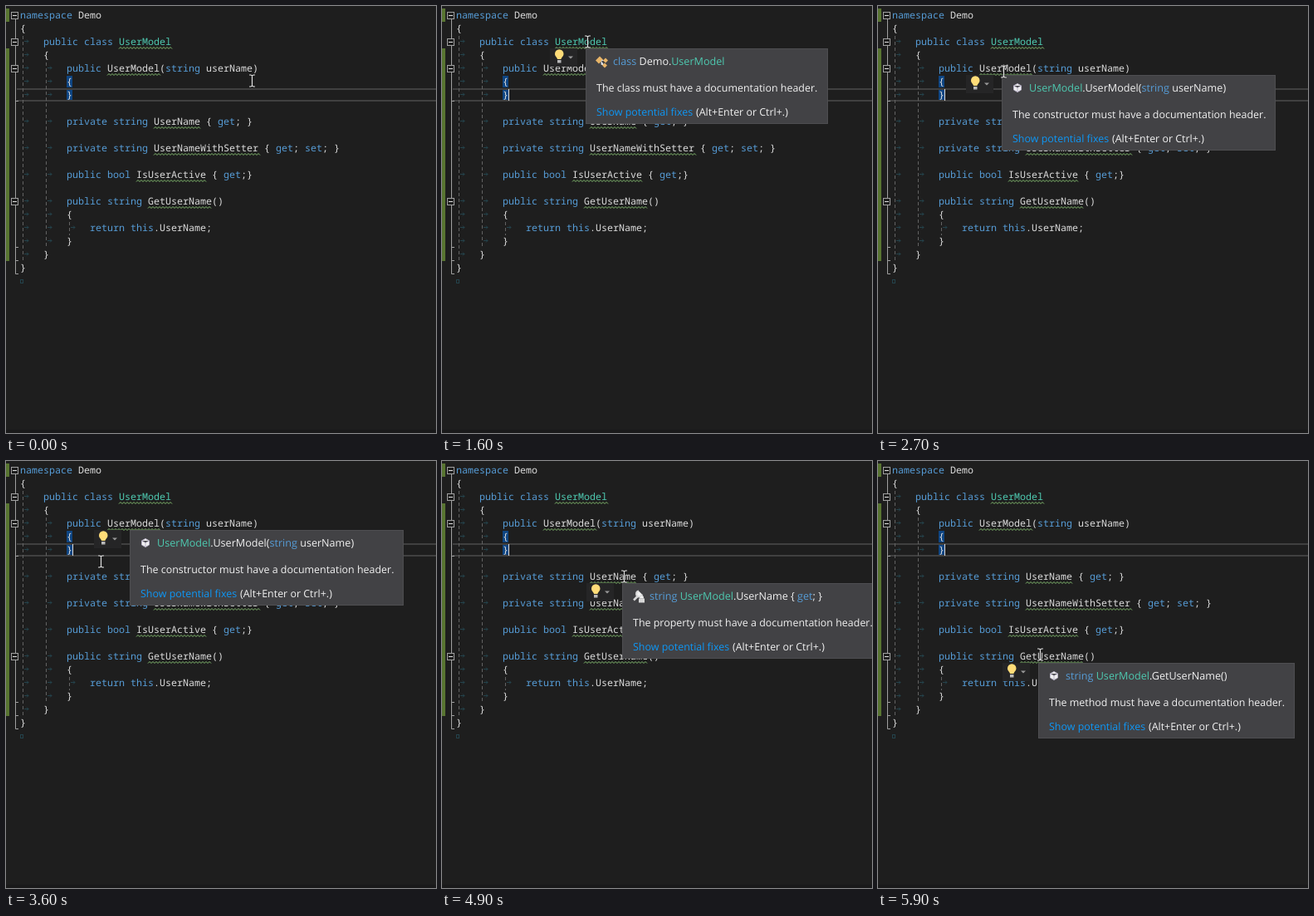
These frames come from a looping animation (518x514 px, 6000 ms). An HTML page:

```html
<!DOCTYPE html>
<html lang="en">
<head>
<meta charset="utf-8">
<title>Code hints</title>
<style>
html, body { margin: 0; height: 100%; overflow: hidden; background: #1e1e1e; }
svg { display: block; }
text { white-space: pre; text-rendering: geometricPrecision; }
.code { font: 11.667px "Noto Sans Mono", monospace; }
.tip { font: 12.45px "Open Sans", sans-serif; fill: #f1f1f1; }
.head { font-size: 12.6px; }
</style>
</head>
<body>
<svg id="stage" width="518" height="514" viewBox="0 0 518 514" fill="none"></svg>
<script>
const BLUE = '#569cd6', TEAL = '#4ec9b0', PLAIN = '#dcdcdc', FAINT = '#24434c';
const KEYWORD = /^(namespace|public|private|class|string|bool|get|set|return|this)$/;

// [indent in tabs, text, underlined name]
const lines = [
  [0, 'namespace Demo'],
  [0, '{'],
  [1, 'public class UserModel', 'UserModel'],
  [1, '{'],
  [2, 'public UserModel(string userName)', 'UserModel'],
  [2, '{'],
  [2, '}'],
  [0, ''],
  [2, 'private string UserName { get; }', 'UserName'],
  [0, ''],
  [2, 'private string UserNameWithSetter { get; set; }', 'UserNameWithSetter'],
  [0, ''],
  [2, 'public bool IsUserActive { get;}', 'IsUserActive'],
  [0, ''],
  [2, 'public string GetUserName()', 'GetUserName'],
  [2, '{'],
  [3, 'return this.UserName;'],
  [2, '}'],
  [1, '}'],
  [0, '}']
];

const cube = '<path d="M0-5L4.5-2.5V2.5L0 5L-4.5 2.5V-2.5ZM-4.5-2.5L0 0L4.5-2.5M0 0V5" stroke="#b9b3c6"/>';
const classIcon = `<path d="M-7-1L-2-6L2-2L-3 3Z" fill="#e8b568"/>
  <path d="M0-1H4M0 0V4H3" stroke="#d8d8d8"/>
  <path d="M2-1L5-4L8-1L5 2ZM1 5L4 2L7 5L4 8Z" fill="#e8b568"/>`;
const wrench = `<path d="M-5 5L2-2" stroke="#d8d8d8" stroke-width="2.5"/>
  <path d="M1-6A3.5 3.5 0 1 0 5-2" stroke="#d8d8d8" stroke-width="2"/>
  <path d="M1 3H8V8H1Z" fill="#d8d8d8"/><path d="M2.500 3V1.500A2 2 0 0 1 6.500 1.500V3" stroke="#d8d8d8"/>`;

const tips = [
  { from: 1400, to: 2100, x: 173, y: 51, w: 292, icon: classIcon, head: 'class Demo.UserModel', kind: 'class' },
  { from: 2600, to: 3700, x: 149, y: 83, w: 330, icon: cube, head: 'UserModel.UserModel(string userName)', kind: 'constructor' },
  { from: 4300, to: 5000, x: 217, y: 147, w: 312, icon: wrench, head: 'string UserModel.UserName { get; }', kind: 'property' },
  { from: 5800, to: 6000, x: 193, y: 243, w: 309, icon: cube, head: 'string UserModel.GetUserName()', kind: 'method' }
];

// Pointer stops: time, x, y
const stops = [
  [0, 296, 89], [200, 296, 89], [1000, 175, 42], [2000, 175, 42], [2400, 151, 78],
  [3000, 151, 78], [3300, 114, 120], [3600, 114, 120], [4000, 219, 138], [4900, 219, 138],
  [5300, 183, 195], [5500, 195, 232], [6000, 195, 232]
];

const rect = (x, y, w, h, fill) => `<rect x="${x}" y="${y}" width="${w}" height="${h}" fill="${fill}"/>`;
const stroke = (d, color, extra = '') => `<path d="${d}" stroke="${color}" ${extra}/>`;

function codeLine([indent, text, name], row) {
  const left = 17 + 28 * indent, y = 15 + 16 * row;
  let out = '';
  for (let i = 0; i < indent; i++)
    out += stroke(`M${22 + 28 * i} ${y - 4.5}h5m-2-2l2 2l-2 2`, FAINT);
  for (const { 0: word, index } of text.matchAll(/\w+|[^\w\s]+/g)) {
    const isType = word === name && text.includes('class');
    const color = isType ? TEAL : KEYWORD.test(word) ? BLUE : PLAIN;
    out += `<text class="code" x="${left + 7 * index}" y="${y}" fill="${color}">${word}</text>`;
  }
  if (name) {
    const x = left + 7 * text.indexOf(name);
    const waves = 'l2-2l2 2'.repeat(Math.round(name.length * 7 / 4));
    out += stroke(`M${x} ${y + 4.5}${waves}`, '#84bd70');
  }
  return out;
}

function gutter() {
  const grey = '#a0a0a0';
  const box = y => `<rect x="6.5" y="${y - 4.5}" width="8" height="8" fill="#1e1e1e" stroke="${grey}"/>`
    + stroke(`M8 ${y - .5}h5`, '#e0e0e0');
  return rect(0, 3, 4, 16, '#587531') + rect(0, 51, 4, 256, '#587531')
    + stroke('M11.500 16V322.500H15M11.500 114.500H15M11.500 290.500H15M11.500 306.500H15', grey)
    + [12, 44, 76, 236].map(box).join('')
    + stroke('M20.500 36V306M48.500 68V290M76.500 260V276', '#626262', 'stroke-dasharray="4 3"');
}

function tip({ x, y, w, icon, head, kind }) {
  const title = head
    .replace(/\b(class|string|get)\b/g, `<tspan fill="${BLUE}">$1</tspan>`)
    .replace('UserModel', `<tspan fill="${TEAL}">UserModel</tspan>`);
  return `<g class="tip" transform="translate(${x} ${y})" visibility="hidden">
    ${rect(-43, 0, 33, 22, '#252526')}
    <path d="M-34 13C-34 11-37 10-37 6.500A5.200 5.200 0 0 1-26.500 6.500C-26.500 10-29.500 11-29.500 13Z" fill="#ffdc78"/>
    ${rect(-34, 14, 4.5, 3.5, '#b8b8b8')}
    <path d="M-21 9.500H-15L-18 12.500Z" fill="#999"/>
    <rect x=".5" y=".5" width="${w - 1}" height="90" fill="#424245" stroke="#4e4e51"/>
    <g transform="translate(19 15.500)">${icon}</g>
    <text class="head" x="33" y="20">${title}</text>
    <text x="13" y="52">The ${kind} must have a documentation header.</text>
    <text x="13" y="81" fill="#0e97f5">Show potential fixes</text>
    <text x="133" y="81">(Alt+Enter or Ctrl+.)</text>
  </g>`;
}

const beam = 'M-3.500-6.500H-1.500L0-5.500L1.500-6.500H3.500M0-5.500V6.500M-3.500 7.500H-1.500L0 6.500L1.500 7.500H3.500';
const stage = document.getElementById('stage');
stage.innerHTML = rect(0, 0, 518, 514, '#1e1e1e') + rect(0, 510, 518, 4, '#19191a')
  + stroke('M13 100H518M13 114H518', '#4c4c4c', 'stroke-width="1.5"')
  + rect(73, 84, 7, 14, '#0e4583') + rect(73, 101, 7, 12, '#0e4583')
  + gutter() + lines.map(codeLine).join('')
  + `<rect x="17.500" y="329.500" width="3" height="4" stroke="${FAINT}"/>`
  + '<path id="caret" d="M80.500 100V114" stroke="#dcdcdc"/>'
  + tips.map(tip).join('')
  + `<g id="pointer">${stroke(beam, '#111', 'stroke-width="2.5" opacity=".5"')}${stroke(beam, '#e4e4e4', 'stroke-width="1.2"')}</g>`;

const caret = document.getElementById('caret');
const pointer = document.getElementById('pointer');
const tipNodes = stage.querySelectorAll('.tip');
const show = (node, on) => node.setAttribute('visibility', on ? 'visible' : 'hidden');

function pointerAt(t) {
  const i = stops.findIndex(stop => stop[0] > t);
  const [t0, x0, y0] = stops[i - 1], [t1, x1, y1] = stops[i];
  const p = (t - t0) / (t1 - t0), e = p * p * (3 - 2 * p);
  return [x0 + (x1 - x0) * e, y0 + (y1 - y0) * e].map(Math.round);
}

function draw(now) {
  const t = Math.floor(now % 6000 / 100) * 100;
  const [x, y] = pointerAt(t === 100 ? 0 : t);
  pointer.setAttribute('transform', `translate(${x + .5} ${y + .5})`);
  show(caret, (t + 800) % 1060 < 530);
  tips.forEach(({ from, to }, i) => show(tipNodes[i], t >= from && t < to));
}

const start = performance.now();
function tick() {
  draw(performance.now() - start);
  requestAnimationFrame(tick);
}
tick();
</script>
</body>
</html>
```
